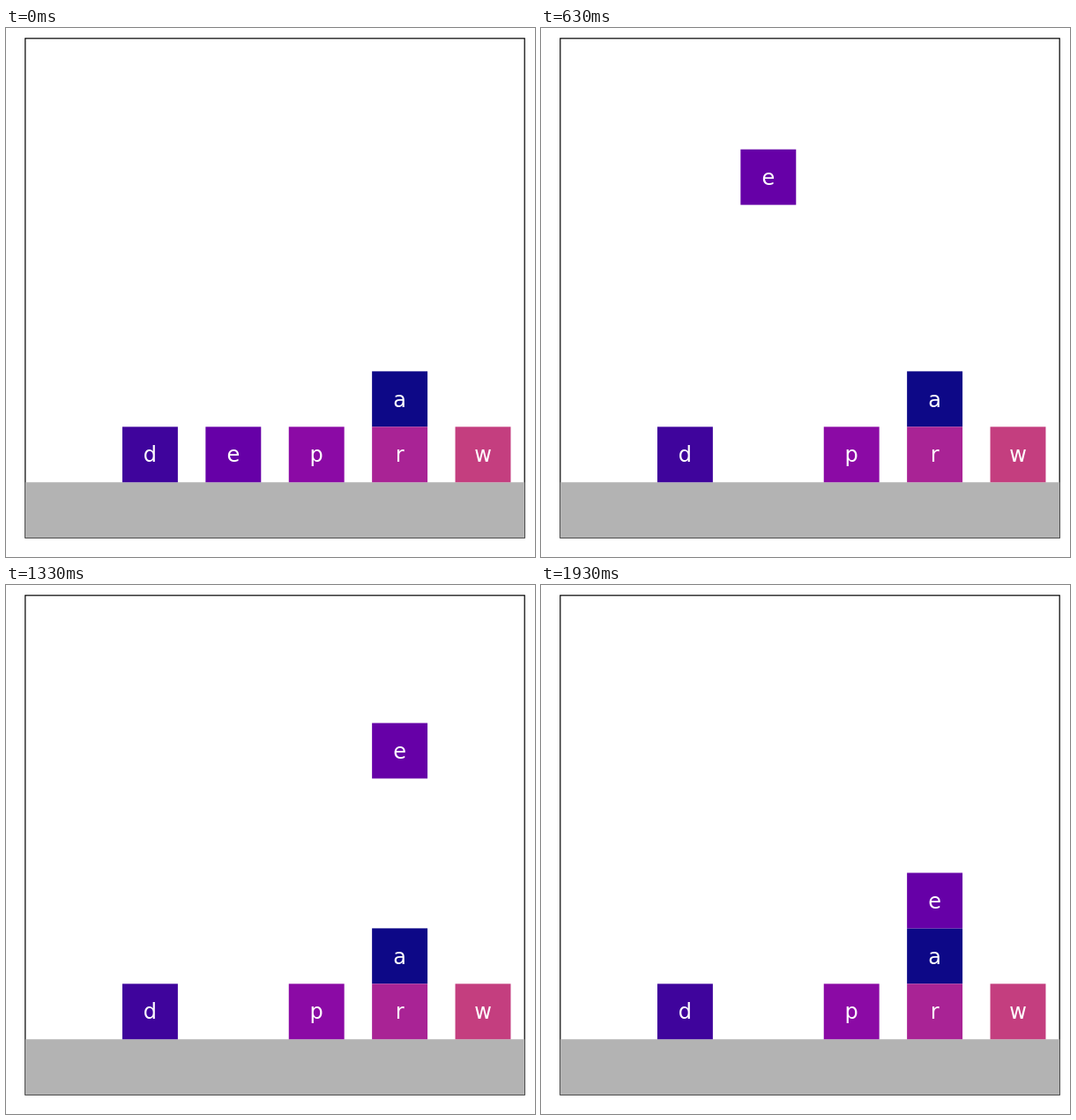
Animation, 600 px wide and 600 px high, one loop 1.96 s. Source, as an HTML page with a canvas:

```html
<!DOCTYPE html>
<html>
<head>
<meta charset="utf-8">
<style>
html, body { margin: 0; width: 100%; height: 100%; overflow: hidden; background: #fff; }
canvas { display: block; }
</style>
</head>
<body>
<canvas id="stage" width="600" height="600"></canvas>
<script>
const ctx = document.getElementById('stage').getContext('2d');
const LOOP = 1960, FPS = 30;
const UNIT = 62.93, LEFT = 21.83, TOP = 11.81, SIZE = 9 * UNIT;

const blocks = [
  { name: 'd', color: '#3f049c', col: 0, row: 0 },
  { name: 'p', color: '#8b0aa5', col: 2, row: 0 },
  { name: 'a', color: '#0d0887', col: 3, row: 1 },
  { name: 'r', color: '#a92395', col: 3, row: 0 },
  { name: 'w', color: '#c43e7f', col: 4, row: 0 }
];

const clamp = v => Math.max(0, Math.min(1, v));

function drawBlock({ name, color, col, row }) {
  const x = LEFT + (1.75 + 1.5 * col) * UNIT;
  const y = TOP + (7 - row) * UNIT;
  ctx.fillStyle = color;
  ctx.fillRect(x, y, UNIT, UNIT);
  ctx.fillStyle = '#fff';
  ctx.fillText(name, x + UNIT / 2, y + UNIT / 2 + 8.7);
}

// Lift five rows, pause, slide two columns, then lower onto the stack.
function carried(step) {
  const lift = step < 1 ? 0 : clamp((step + 1) / 20);
  const slide = step < 30 ? 0 : clamp((step - 28) / 10);
  const lower = clamp((step - 38) / 20);
  return { name: 'e', color: '#6600a7', col: 1 + 2 * slide, row: 5 * lift - 3 * lower };
}

function draw(now) {
  const time = now % LOOP;
  const step = Math.min(58, Math.floor((time + 5) * FPS / 1000));
  ctx.fillStyle = '#fff';
  ctx.fillRect(0, 0, 600, 600);
  ctx.strokeStyle = '#000';
  ctx.lineWidth = 1.2;
  ctx.strokeRect(LEFT, TOP, SIZE, SIZE);
  ctx.fillStyle = '#b3b3b3';
  ctx.fillRect(LEFT, TOP + 8 * UNIT, SIZE, UNIT);
  ctx.font = '24px "DejaVu Sans", sans-serif';
  ctx.textAlign = 'center';
  blocks.forEach(drawBlock);
  drawBlock(carried(step));
  requestAnimationFrame(draw);
}
requestAnimationFrame(draw);
</script>
</body>
</html>
```
